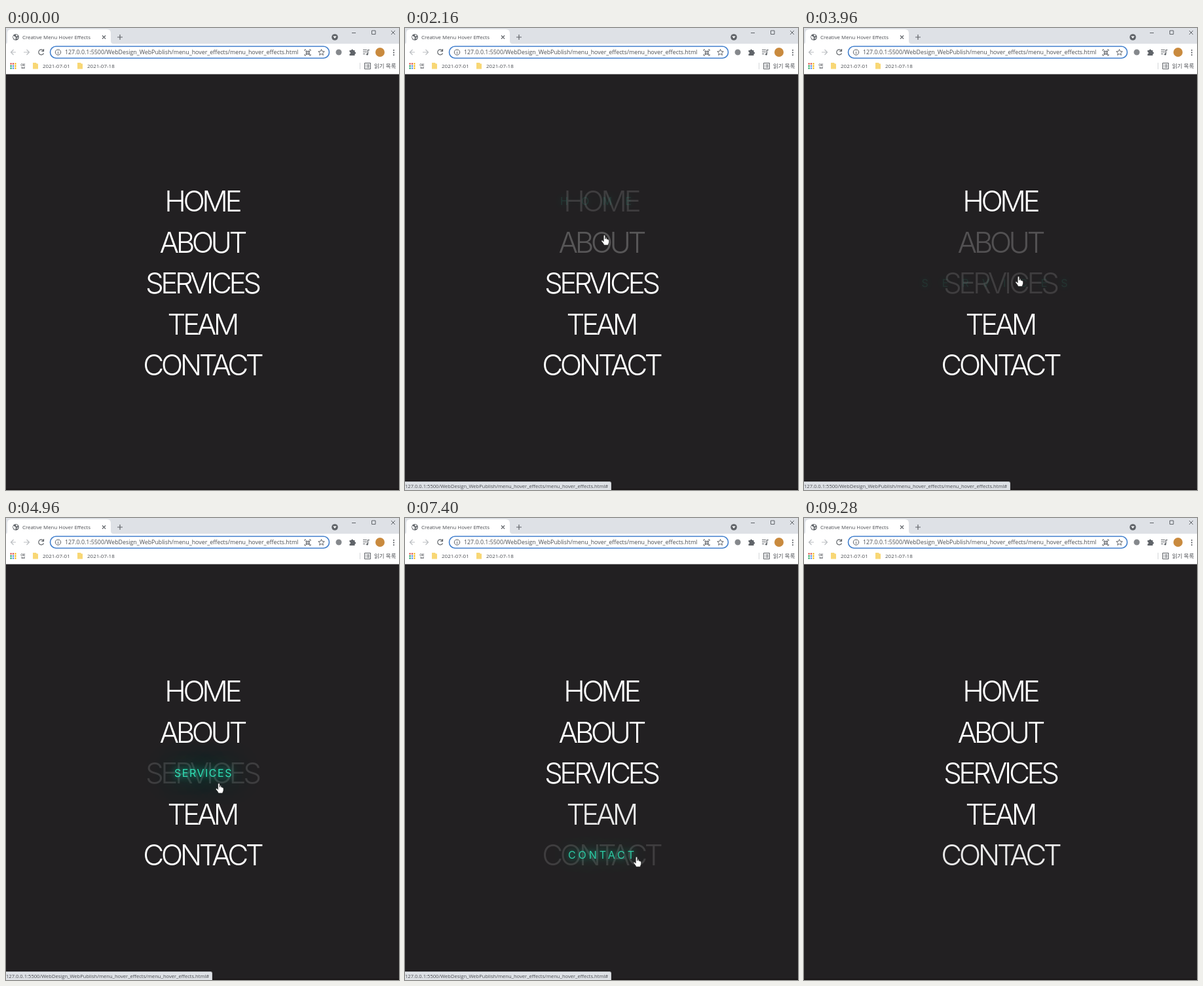
These frames come from a looping animation (600x705 px, 9320 ms). An HTML page:

```html
<!DOCTYPE html>
<html lang="en">
<head>
<meta charset="utf-8">
<title>Creative Menu Hover Effects</title>
<style>
html, body { margin: 0; width: 100%; height: 100%; overflow: hidden; background: #222022; }
svg { position: absolute; left: 0; top: 0; }
svg text { font-family: "Open Sans", "Noto Sans CJK KR", sans-serif; fill: #4b4e53; }
.line { fill: none; stroke: #5f6368; stroke-width: 1.2; }
.thin { stroke-width: 1; }
.word, .glow { position: absolute; left: 301.5px; transform: translate(-50%, -50%); white-space: nowrap; line-height: 1; font-family: Inter, sans-serif; }
.word { color: #fff; font-size: 44px; font-weight: 300; letter-spacing: -4.5px; text-indent: -4.5px; }
.glow { color: #2fe0b5; font-size: 16px; text-shadow: 0 0 10px #1bbd95, 0 0 30px #1bbd95, 0 0 80px #1bbd95; }
#status { position: absolute; left: 0; bottom: 0; height: 13px; box-sizing: border-box; overflow: hidden; white-space: nowrap; background: #dee1e6; border: solid #c3c6ca; border-width: 1px 1px 0 0; border-radius: 0 3px 0 0; font: 7.58px/12px "Open Sans", sans-serif; color: #4b4e53; }
</style>
</head>
<body>
<svg width="600" height="705">
  <path d="M0 0H600V24H0Z" fill="#dee1e6"/>
  <path d="M0 24Q2 24 2 21V8Q2 2 8 2H154Q160 2 160 8V20Q160 24 164 24H600V70.600H0Z" fill="#fff"/>
  <path d="M0 703H600V705H0Z" fill="#1a1718"/>
  <circle cx="15" cy="14" r="4.800" fill="#5f6368"/>
  <path d="M11 12l3 1 1 2-1 3-3-3ZM15 10l3 1-1 2-2-1ZM16 15l3-1-2 3Z" fill="#fff"/>
  <text x="25" y="17" font-size="7.900">Creative Menu Hover Effects</text>
  <path class="line" d="M147 11.500l5 5m0-5l-5 5M170 14h8m-4-4v8"/>
  <circle cx="502" cy="14" r="4.800" fill="#5f6368"/>
  <path d="M499.300 12.500h5.400l-2.700 3.400Z" fill="#fff"/>
  <path class="line thin" d="M528 7.500h6M558.500 4h5.500v5.500h-5.500ZM588 4l6 6m0-6l-6 6"/>
  <path class="line" d="M15 37H7.500m4-4l-4 4 4 4M27 37h8.500m-4-4l4 4-4 4" style="stroke:#bbbec2"/>
  <path class="line" d="M57 34.500a4 4 0 1 0 .5 4M57.500 32v3.300h-3.300"/>
  <rect x="67.500" y="28" width="426" height="18" rx="9" fill="#fff" stroke="#4380cd" stroke-width="1.600"/>
  <circle class="line thin" cx="79.500" cy="37" r="4.200"/>
  <path class="line thin" d="M79.500 36.500v3M79.500 34.300v1"/>
  <text x="90" y="40" font-size="8.850">127.0.0.1:5500/WebDesign_WebPublish/menu_hover_effects/menu_hover_effects.html</text>
  <path class="line thin" d="M456 35v-2h2m5 0h2v2m0 5v2h-2m-5 0h-2v-2M458 35h2v2h-2Zm3.500 0h2v2h-2ZM458 38.500h2v2h-2Zm3.500 0h2v2h-2Z"/>
  <path class="line thin" d="M481.500 32.500l1.300 3.100 3.400.3-2.600 2.200.8 3.300-2.900-1.800-2.900 1.800.8-3.300-2.600-2.200 3.400-.3Z"/>
  <circle cx="508" cy="37" r="4.500" fill="#85888c"/>
  <path d="M524.500 34h2.500a1.600 1.600 0 1 1 3.200 0h2.300v2.500a1.600 1.600 0 1 1 0 3.200V42h-8v-2.500a1.500 1.500 0 1 0 0-3Z" fill="#5f6368"/>
  <path class="line" d="M545 33.500h6m-6 3h6m-6 3h3.500M552.500 39.500v-6h2.500"/>
  <circle cx="551.500" cy="40" r="1.500" fill="#5f6368"/>
  <circle cx="571" cy="37" r="7" fill="#c98a3e"/>
  <path d="M592 33v9" stroke="#5f6368" stroke-width="1.800" stroke-dasharray="1.800"/>
  <g id="apps"></g>
  <text x="22" y="61" font-size="8">앱</text>
  <g id="folders"></g>
  <path d="M540.500 53v10" stroke="#d5d7da"/>
  <path class="line thin" d="M547.500 53.500h9v9h-9ZM549 56h1m1 0h4M549 58h1m1 0h4M549 60h1m1 0h4"/>
  <text x="562" y="61" font-size="8.500">읽기 목록</text>
</svg>
<div id="menu"></div>
<div id="status"></div>
<svg width="600" height="705">
  <g id="cursor" fill="#fff" stroke="#222" stroke-width=".7">
    <path id="hand" d="M-.8 1Q.5-.8 1.800 1V6Q3 0 4.300 6.300 5.500 5.200 6.200 7 7.400 6.400 7.600 8V11Q7 13 6 15.300H0Q-1.500 12-4 9.500-4.500 7.300-2.500 8L-.8 9.700Z"/>
    <path id="arrow" d="M0 0V13L3 10.300 5 15 7 14 5 9.600H9Z"/>
  </g>
</svg>
<script>
const LOOP = 9320, FADE = 500, DIM = 0.13, WIDE = 23, TIGHT = 1.5;
const $ = id => document.getElementById(id);
const clamp = x => Math.max(0, Math.min(1, x));
const mix = (a, b, k) => a + (b - a) * k;
const ramp = (t, start, length) => clamp((t - start) / length);
const smooth = x => x * x * (3 - 2 * x);

// The CSS "ease" curve, cubic-bezier(.25, .1, .25, 1)
function ease(x) {
  const curve = (a, b, s) => 3 * a * s * (1 - s) ** 2 + 3 * b * s * s * (1 - s) + s ** 3;
  let low = 0, high = 1;
  for (let i = 0; i < 20; i++) {
    const s = (low + high) / 2;
    if (curve(0.25, 0.25, s) < x) low = s; else high = s;
  }
  return curve(0.1, 1, low);
}
const fade = (t, start) => ease(ramp(t, start, FADE));

const enter = [390, 1870, 3410, 5000, 6600, 8480];
const items = ["HOME", "ABOUT", "SERVICES", "TEAM", "CONTACT"].map((text, i) => {
  const add = className => {
    const el = document.createElement("div");
    el.className = className;
    el.textContent = text;
    el.style.top = 264 + 62.5 * i + "px";
    return $("menu").appendChild(el);
  };
  return { word: add("word"), glow: add("glow"), on: enter[i], off: enter[i + 1] };
});

const appColors = ["#db4437", "#db4437", "#f4b400", "#0f9d58", "#4285f4", "#f4b400", "#0f9d58", "#4285f4", "#f4b400"];
$("apps").innerHTML = appColors.map((c, i) =>
  `<rect x="${6.5 + i % 3 * 3.4}" y="${53.5 + Math.floor(i / 3) * 3.4}" width="2.2" height="2.2" fill="${c}"/>`).join("");
$("folders").innerHTML = [[41, "2021-07-01"], [109, "2021-07-18"]].map(([x, name]) =>
  `<path d="M${x} 53h5l1 1.500h2v8h-8Z" fill="#f8d775"/><text x="${x + 15}" y="61" font-size="8">${name}</text>`).join("");

// Pointer moves: start, duration, x, y
const moves = [[240, 240, 292, 246], [1720, 350, 304, 316], [3160, 540, 327, 379],
  [4760, 450, 321, 440], [6440, 320, 353, 517], [8280, 420, 604, 440]];

function drawCursor(t) {
  let x = 594, y = 280;
  for (const [start, length, toX, toY] of moves) {
    const k = smooth(ramp(t, start, length));
    x = mix(x, toX, k);
    y = mix(y, toY, k);
  }
  const onLink = t >= enter[0] && t < enter[5];
  $("cursor").setAttribute("transform", `translate(${x} ${y})`);
  $("cursor").style.display = t >= 240 && t < 8700 ? "" : "none";
  $("hand").style.display = onLink ? "" : "none";
  $("arrow").style.display = onLink ? "none" : "";
}

function drawStatus(t) {
  const grow = smooth(ramp(t, 1980, 150));
  const dip = 0.3 * (ramp(t, 5000, 100) - ramp(t, 5120, 120));
  const bar = $("status");
  bar.textContent = "127.0.0.1:5500/" + (grow > 0
    ? "WebDesign_WebPublish/menu_hover_effects/menu_hover_effects.html#" : ".../menu_hover_effects.html");
  bar.style.width = mix(199, 315, grow) + "px";
  bar.style.opacity = ramp(t, 470, 120) - ramp(t, 8730, 200) - dip;
}

function draw(t) {
  for (const { word, glow, on, off } of items) {
    const dim = fade(t, on) - fade(t, off + FADE);
    const shown = fade(t, on + FADE) - fade(t, off);
    word.style.opacity = mix(1, DIM, dim);
    glow.style.opacity = shown;
    glow.style.letterSpacing = mix(WIDE, TIGHT, shown) + "px";
  }
  drawStatus(t);
  drawCursor(t);
}

const begin = performance.now();
(function tick() {
  draw((performance.now() - begin) % LOOP);
  requestAnimationFrame(tick);
})();
</script>
</body>
</html>
```
